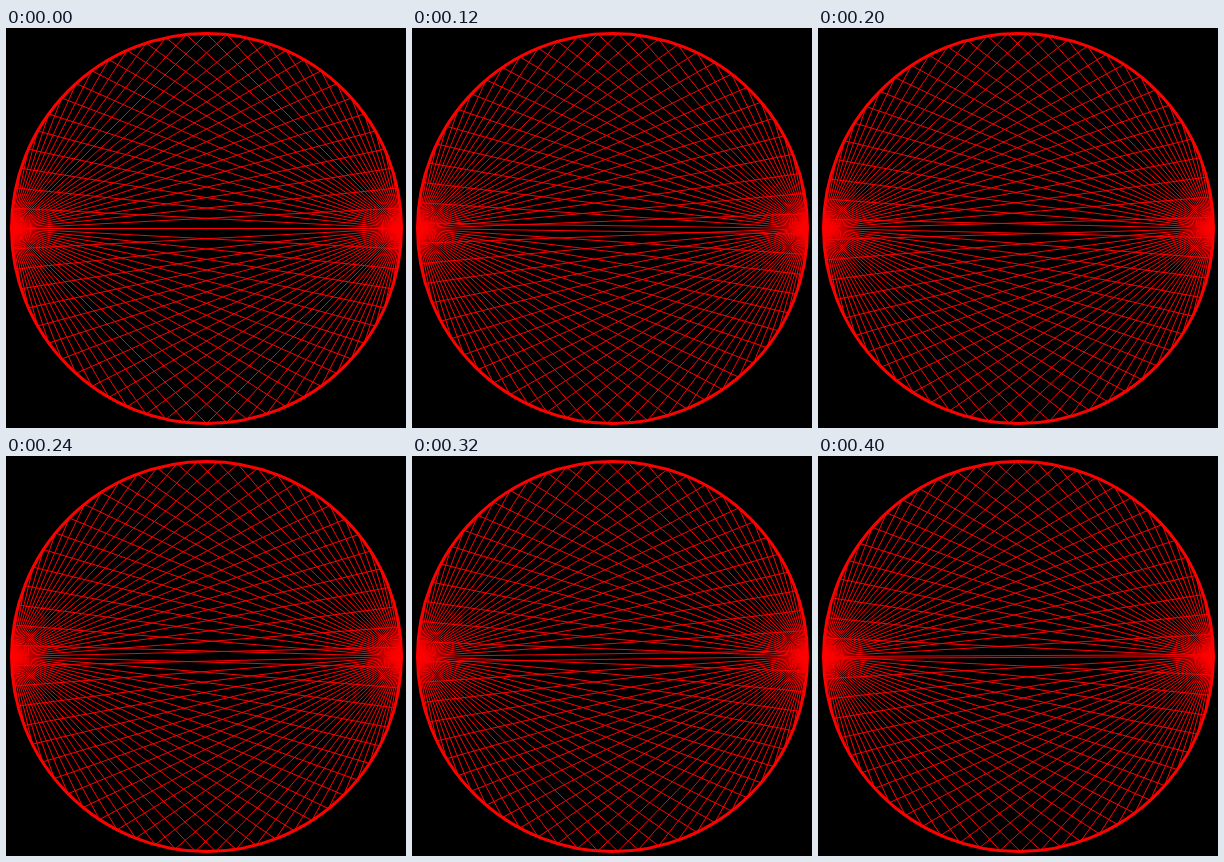
Recreate the animation shown at these times as an HTML page with a canvas. Size 400 by 400 pixels, loop 440 ms.

```html
<!DOCTYPE html>
<html>
<head>
<meta charset="utf-8">
<style>
  html, body { margin: 0; width: 100%; height: 100%; overflow: hidden; background: #000; }
  canvas { display: block; width: 400px; height: 400px; }
</style>
</head>
<body>
<canvas id="stage" width="400" height="400"></canvas>
<script>
  const ctx = document.getElementById('stage').getContext('2d');
  const LOOP = 440, STEPS = 11, POINTS = 60;
  const C = 200.5, R = 195;
  let shown = -1;

  function draw(step) {
    ctx.fillStyle = '#000';
    ctx.fillRect(0, 0, 400, 400);
    ctx.strokeStyle = '#f00';
    ctx.lineWidth = 1;
    ctx.beginPath();
    for (let i = 0; i < POINTS; i++) {
      const a = (i + step / STEPS) * 2 * Math.PI / POINTS;
      ctx.moveTo(C - R, C);
      ctx.lineTo(C + R * Math.cos(a), C + R * Math.sin(a));
      ctx.lineTo(C + R, C);
    }
    ctx.stroke();
    ctx.lineWidth = 3;
    ctx.beginPath();
    ctx.arc(C, C, R, 0, 2 * Math.PI);
    ctx.stroke();
  }

  function tick() {
    const step = Math.floor(performance.now() % LOOP / (LOOP / STEPS));
    if (step !== shown) draw(shown = step);
    requestAnimationFrame(tick);
  }
  tick();
</script>
</body>
</html>
```
